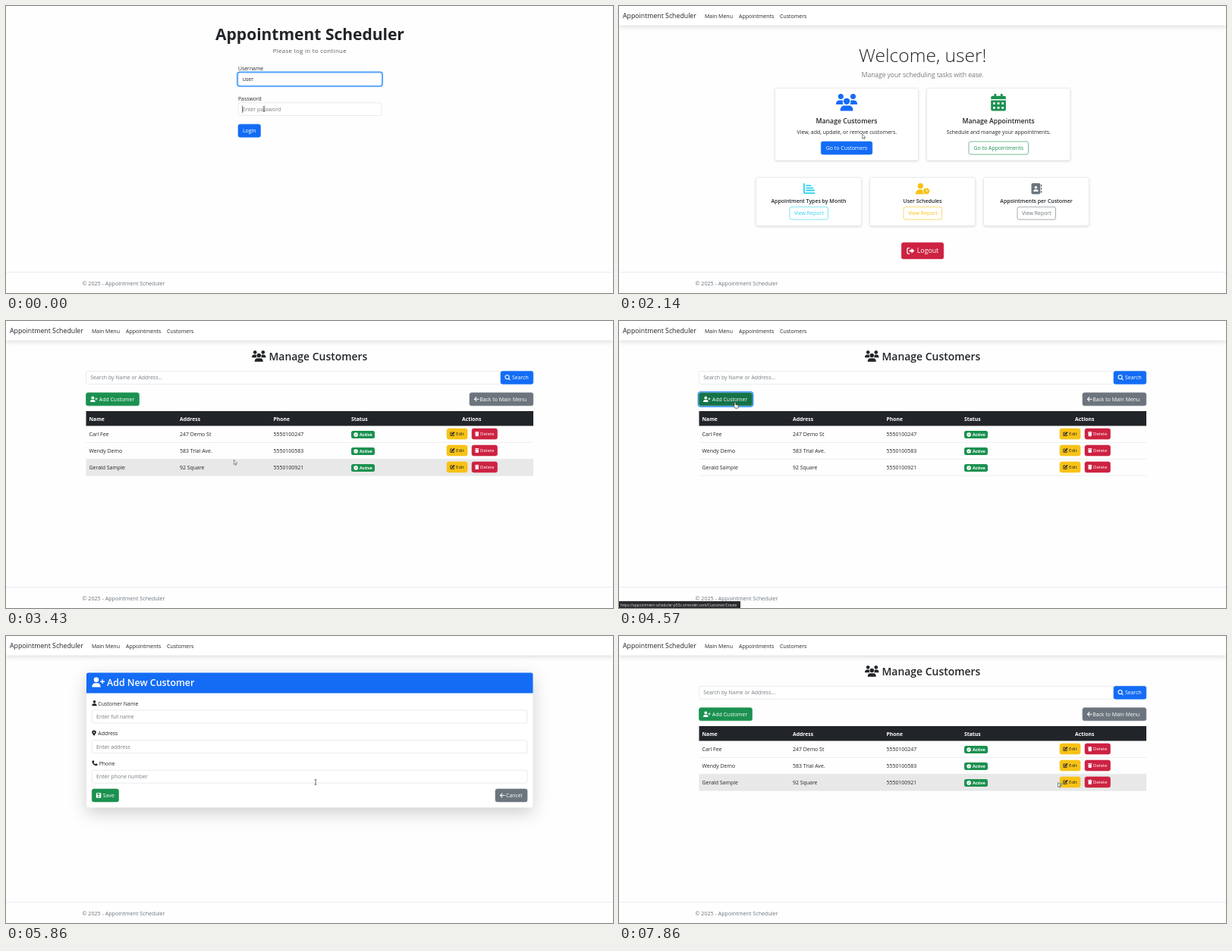
An HTML page for the animation above (8 s loop, 800x379 px).

```html
<!DOCTYPE html>
<html lang="en">
<head>
<meta charset="utf-8">
<title>Appointment Scheduler</title>
<style>
html, body { margin: 0; width: 100%; height: 100%; overflow: hidden; background: #fefefe; }
svg { display: block; width: 800px; height: 379px; font-family: "Open Sans", "Noto Sans", sans-serif; }
text { white-space: pre; }
</style>
</head>
<body>
<svg id="stage" viewBox="0 0 800 379"></svg>
<script>
const INK = '#212529', BLUE = '#146cf5', GREEN = '#1b9150', RED = '#cd2242',
      AMBER = '#f8c216', GREY = '#6c757d', CYAN = '#2fd2ee', EDGE = '#dee2e6';
const LOOP = 8000, TICKS = 56;
const SITE = 'https://appointment-scheduler-p53z.onrender.com/';
const CLICKS = [9, 10, 21, 32, 49];
const PEOPLE = [
  ['Carl Fee', '247 Demo St', '5550100247'],
  ['Wendy Demo', '583 Trial Ave.', '5550100583'],
  ['Gerald Sample', '92 Square', '5550100921']
];
// tick, x, y of the pointer
const PATH = [
  [0, 340, 136], [5, 340, 136], [8, 322, 167], [14, 322, 167], [19, 309, 188], [23, 309, 188],
  [30, 153, 107], [34, 153, 107], [41, 408, 193], [47, 677, 210], [52, 677, 210],
  [53, 650, 202], [55, 578.5, 193.5]
];
// first tick, last tick, path shown in the status bar
const LINKS = [[19, 23, 'Customer'], [29, 34, 'Customer/Create'], [47, 52, 'Customer']];

let tick, pointer, shape;

const text = (x, y, s, size = 6.95, fill = INK, extra = '') =>
  `<text x="${x}" y="${y}" font-size="${size}" fill="${fill}" ${extra}>${s}</text>`;
const mid = (x, y, s, size, fill, weight = 400) =>
  text(x, y, s, size, fill, `text-anchor="middle" font-weight="${weight}"`);
const bold = (x, y, s, size, fill, weight = 600) =>
  text(x, y, s, size, fill, `font-weight="${weight}"`);
const rect = (x, y, w, h, fill, extra = '') =>
  `<rect x="${x}" y="${y}" width="${w}" height="${h}" fill="${fill}" ${extra}/>`;
const line = (x1, x2, y, stroke = EDGE) =>
  `<path d="M${x1} ${y}H${x2}" stroke="${stroke}" stroke-width=".6"/>`;
const ring = (x, y, w, h) =>
  rect(x - 1.2, y - 1.2, w + 2.4, h + 2.4, 'none', 'rx="3.4" stroke="#258cfb" stroke-width="1.3"');
const over = (x, y, w, h) =>
  pointer.x >= x && pointer.x <= x + w && pointer.y >= y && pointer.y <= y + h;

// Glyphs on a grid 16 units high; currentColor is the ink, "back" shows through.
const PERSON = '<circle cx="7" cy="4" r="4"/><path d="M0 16c0-4 2-6.500 5-6.500h4c3 0 5 2.500 5 6.500z"/>';
const GLYPHS = {
  user: () => PERSON,
  userPlus: () => PERSON + '<path d="M17 3.500v7M13.500 7h7" stroke="currentColor" stroke-width="1.700"/>',
  userClock: back => PERSON + `<circle cx="15.500" cy="11.500" r="5" stroke="${back}"/><path d="M15.500 8.500v3h2" fill="none" stroke="${back}"/>`,
  users: () => '<circle cx="4.500" cy="2.500" r="2.500"/><circle cx="16" cy="2.500" r="2.500"/><circle cx="10" cy="7" r="3"/>' +
    '<path d="M4 16c0-3.500 1.500-5 4-5h4c2.500 0 4 1.500 4 5zM0 10c0-2.500 1-4 3-4h2.500l1 .5q-.8 2 .5 3.500zM20 10c0-2.500-1-4-3-4h-2.500l-1 .5q.8 2-.5 3.500z"/>',
  calendar: back => '<path d="M3 0h2v2h4V0h2v2h1.500q1.500 0 1.500 1.500V5H0V3.500Q0 2 1.500 2H3zM0 6h14v8.500q0 1.500-1.500 1.500h-11Q0 16 0 14.500z"/>' +
    `<path d="M2 9h10M2 13h10" stroke="${back}" stroke-width="2" stroke-dasharray="2"/>`,
  chart: () => '<path d="M1 1v12q0 1.500 1.500 1.500H16M4.500 3.500h6M4.500 7h9M4.500 10.500h11" fill="none" stroke="currentColor" stroke-width="2" stroke-linecap="round"/>',
  book: back => `<rect width="13" height="16" rx="2"/><path d="M14.500 2v3M14.500 6.500v3M14.500 11v3" stroke="currentColor" stroke-width="1.500"/>
    <g fill="${back}"><circle cx="6.500" cy="6" r="2"/><path d="M3 12q0-3 2.500-3h2Q10 9 10 12z"/></g>`,
  exit: () => '<path d="M6 2H3Q1 2 1 4v8q0 2 2 2h3" fill="none" stroke="currentColor" stroke-width="2"/><path d="M5.500 6H10V2.500L16 8l-6 5.500V10H5.500z"/>',
  search: () => '<path d="M11 11l4 4M12 6.500a5.500 5.500 0 1 1-11 0a5.500 5.500 0 0 1 11 0" fill="none" stroke="currentColor" stroke-width="2.200"/>',
  back: () => '<path d="M15 8H2M8 2L2 8l6 6" fill="none" stroke="currentColor" stroke-width="2.200"/>',
  check: back => `<circle cx="8" cy="8" r="8"/><path d="M4.500 8l2.500 2.500 4.500-5" fill="none" stroke="${back}" stroke-width="2"/>`,
  edit: () => '<path d="M8 3H2v11h11V9" fill="none" stroke="currentColor" stroke-width="2"/><path d="M5.500 8L12 1.500q1.500-1.500 3 0t0 3L8.500 11l-4 1z"/>',
  trash: () => '<path d="M0 1h4l1-1h4l1 1h4v2H0zM1 4h12l-1 12H2z"/>',
  pin: back => `<path d="M6 16Q0 9 0 6a6 6 0 0 1 12 0q0 3-6 10"/><circle cx="6" cy="6" r="2" fill="${back}"/>`,
  phone: () => '<path d="M1 1l4-1 2 4.500-2.300 2q1.500 3 4.800 4.800l2-2.300 4.500 2-1 4Q13 16 11 15.500 2 13 .3 4.500 0 2 1 1"/>',
  save: back => `<rect y="1" width="14" height="14" rx="2"/><path d="M3 3h7v3.500H3z" fill="${back}"/><circle cx="7" cy="10.500" r="2" fill="${back}"/>`
};
const icon = (name, x, y, h, ink, back = '#fff') =>
  `<g transform="translate(${x} ${y}) scale(${h / 16})" fill="${ink}" color="${ink}">${GLYPHS[name](back)}</g>`;

function button(x, y, w, h, label, color, o = {}) {
  const hot = over(x, y, w, h);
  if (hot) shape = 'hand';
  const fill = o.outline ? '#fff' : hot && o.hover ? o.hover : color;
  const fg = o.outline ? color : o.fg || '#fff';
  const caption = o.icon
    ? icon(o.icon, x + o.pad, y + (h - o.glyph) / 2, o.glyph, fg, fill) + text(x + o.tx, y + h / 2 + o.size * .35, label, o.size, fg)
    : mid(x + w / 2, y + h / 2 + 2.5, label, 6.95, fg);
  return rect(x, y, w, h, fill, `rx="2.5" stroke="${o.outline ? color : fill}" stroke-width=".6"`) + caption +
    (hot && CLICKS.includes(tick) ? ring(x, y, w, h) : '');
}
const iconButton = (x, y, w, h, label, color, glyph, tx, o = {}) =>
  button(x, y, w, h, label, color, { icon: glyph, pad: 5.5, glyph: 7.5, tx, size: 6.95, ...o });

function field(x, y, w, h, hint, value = '', focus = false) {
  if (over(x, y, w, h)) shape = 'beam';
  return rect(x, y, w, h, '#fff', `rx="2.5" stroke="${focus ? '#86b7fe' : EDGE}" stroke-width=".7"`) +
    text(x + 5.8, y + h / 2 + 2.6, value || hint, value[0] === '•' ? 8.3 : 6.95, value ? INK : '#747a80') +
    (focus ? ring(x, y, w, h) : '');
}

const footer = () => line(0, 800, 351.5, EDGE) + text(100.5, 369, '© 2025 - Appointment Scheduler', 7.15, GREY);
const navbar = () =>
  rect(0, 0, 800, 25.5, '#fff', 'style="filter:drop-shadow(0 2px 3px #0002)"') +
  text(5, 16.2, 'Appointment Scheduler', 8.78) +
  text(113, 15.7, 'Main Menu', 7) + text(158, 15.7, 'Appointments', 7) + text(212, 15.7, 'Customers', 7);
const card = (x, y, w, h) =>
  rect(x, y, w, h, '#fff', `rx="2.7" stroke="${EDGE}" stroke-width=".6" style="filter:drop-shadow(0 1px 1.5px #0002)"`);

function loginPage() {
  const typed = '•'.repeat(Math.max(0, Math.min(4, tick - 1)));
  const typing = tick > 0 && tick < 9;
  const caret = tick < 9 ? rect(311.4 + typed.length * 3.1, 131.5, .7, 9.5, INK) : '';
  return mid(400.5, 44.5, 'Appointment Scheduler', 21, INK, 700) +
    text(400.3, 62.2, 'Please log in to continue', 7.8, '#555b61', 'text-anchor="middle" letter-spacing=".34"') +
    text(306, 85.2, 'Username', 6.85) + field(306, 88.3, 189, 16.7, '', 'user', tick === 0) +
    text(306, 124.9, 'Password', 6.85) + field(306, 127.8, 189, 16.7, 'Enter password', typed, typing) + caret +
    button(306, 156.2, 29.5, 17, 'Login', BLUE, { hover: '#1459cc' });
}

function menuPage() {
  const reports = [
    ['Appointment Types by Month', CYAN, 'chart', 243],
    ['User Schedules', AMBER, 'userClock', 391],
    ['Appointments per Customer', GREY, 'book', 543.5]
  ];
  return navbar() +
    mid(400.3, 74, 'Welcome, user!', 24.6, INK, 300) +
    mid(400.3, 93.5, 'Manage your scheduling tasks with ease.', 8.83, '#33383c', 300) +
    card(205.5, 108.5, 189, 95.5) + icon('users', 286, 116, 22.5, BLUE) +
    mid(300, 154.5, 'Manage Customers', 8.68, INK, 600) +
    mid(300.3, 168.7, 'View, add, update, or remove customers.') +
    button(266.3, 179, 67.5, 17, 'Go to Customers', BLUE, { hover: '#1468ee' }) +
    card(405.5, 108.5, 189.3, 95.5) + icon('calendar', 490.2, 116, 22.5, GREEN) +
    mid(500, 154.5, 'Manage Appointments', 8.68, INK, 600) +
    mid(500.3, 168.7, 'Schedule and manage your appointments.') +
    button(461, 179, 78.5, 17, 'Go to Appointments', GREEN, { outline: true }) +
    reports.map(([title, color, glyph, gx], i) => {
      const x = 180.5 + i * 150;
      return card(x, 226.5, 139, 63.7) + icon(glyph, gx, 234, 14.5, color) +
        mid(x + 69.5, 260, title, 6.95, INK, 600) +
        button(x + 44.5, 265.3, 50.5, 16.7, 'View Report', color, { outline: true });
    }).join('') +
    iconButton(372.3, 312.6, 55.5, 21.3, 'Logout', RED, 'exit', 20.5, { size: 8.78, pad: 7, glyph: 10 });
}

function customersPage() {
  const heads = [[109.5, 'Name'], [229, 'Address'], [352.5, 'Phone'], [455, 'Status'], [601, 'Actions']];
  const rows = PEOPLE.map((person, i) => {
    const y = 138.5 + i * 21.9, base = y + 13.3;
    const hot = over(105.5, y, 589.5, 21.9);
    return (hot ? rect(105.5, y, 589.5, 21.9, '#e8e8e9') : '') + line(105.5, 695, y + 21.9) +
      person.map((s, col) => text(heads[col][0], base, s)).join('') +
      rect(455, y + 6.6, 31, 10, GREEN, 'rx="2.5"') + icon('check', 458.3, y + 8.8, 5.6, '#fff', GREEN) +
      bold(466, y + 13.6, 'Active', 5.4, '#fff', 700) +
      iconButton(581, y + 3.6, 27, 14, 'Edit', AMBER, 'edit', 12, { fg: INK, size: 6.1, pad: 4, glyph: 6.5 }) +
      iconButton(614, y + 3.6, 33.5, 14, 'Delete', RED, 'trash', 11, { size: 6.1, pad: 4, glyph: 6.2 });
  }).join('');
  return navbar() + icon('users', 324, 39, 14.8, INK) + bold(346.5, 51.6, 'Manage Customers', 13.93) +
    field(105.5, 66.3, 547, 17, 'Search by Name or Address...') +
    iconButton(652, 66.3, 42.8, 17, 'Search', BLUE, 'search', 15) +
    iconButton(105.5, 94.8, 70, 17, 'Add Customer', GREEN, 'userPlus', 17.3, { hover: '#157347' }) +
    iconButton(611, 94.8, 83.8, 17, 'Back to Main Menu', GREY, 'back', 13.2) +
    rect(105.5, 119, 589.5, 19.5, INK) +
    heads.map(([x, s]) => bold(x, 131.5, s, 6.8, '#fff', 700)).join('') + rows;
}

function addPage() {
  const inputs = [
    ['user', 'Customer Name', 'Enter full name'],
    ['pin', 'Address', 'Enter address'],
    ['phone', 'Phone', 'Enter phone number']
  ];
  return navbar() +
    rect(106, 48.5, 588.5, 178, '#fff', 'rx="2.7" style="filter:drop-shadow(0 7.3px 11px rgba(0,0,0,.19))"') +
    `<path d="M106 75.500V51q0-2.500 2.500-2.500h583.500q2.500 0 2.500 2.500v24.500z" fill="${BLUE}"/>` +
    icon('userPlus', 113.3, 54.5, 13, '#fff') + bold(133, 65.6, 'Add New Customer', 12.4, '#fff') +
    inputs.map(([glyph, label, hint], i) => {
      const y = 98 + i * 39.6;
      return icon(glyph, 113.3, y - 13, 7.3, INK) + text(i === 2 ? 122.7 : 121.3, y - 6.5, label) +
        field(113.3, y, 573.7, 17, hint);
    }).join('') +
    iconButton(113.3, 202, 35.2, 17, 'Save', GREEN, 'save', 14.5) +
    iconButton(645, 202, 42, 17, 'Cancel', GREY, 'back', 14, { hover: '#565d64' });
}

function statusBar() {
  const link = LINKS.find(([from, to]) => tick >= from && tick <= to);
  if (!link) return '';
  return rect(0, 370, link[2].length > 8 ? 160 : 143, 9, '#2b2b2d') + text(1.8, 376.5, SITE + link[2], 4.78, '#d8d8da');
}

function cursor() {
  const art = {
    beam: '<path d="M-1.300-3.200h2.600M-1.300 3.200h2.600M0-3.200v6.400" stroke="#333" stroke-width=".7"/>',
    hand: '<path d="M0 0q.9 0 .9 1v2.500l2.600.6q.9.3.8 1.300l-.5 2.800H.2L-1.800 5q0-.9.9-.6V1Q-.9 0 0 0z" fill="#fff" stroke="#111" stroke-width=".6"/>',
    arrow: '<path d="M0 0v6l1.400-1.200 1 2 .9-.4-1-2H4.200z" fill="#fff" stroke="#222" stroke-width=".5"/>'
  }[shape];
  const busy = tick >= 54 ? '<circle cx="4" cy="2" r="1.400" fill="none" stroke="#2b8fd0" stroke-width=".8"/>' : '';
  return `<g transform="translate(${pointer.x} ${pointer.y})">${art}${busy}</g>`;
}

function pointerAt(n) {
  const i = Math.max(1, PATH.findIndex(p => p[0] >= n));
  const [t0, x0, y0] = PATH[i - 1], [t1, x1, y1] = PATH[i];
  const u = (n - t0) / (t1 - t0), k = u * u * (3 - 2 * u);
  return { x: x0 + (x1 - x0) * k, y: y0 + (y1 - y0) * k };
}

function pageAt(n) {
  if (n < 11) return loginPage;
  if (n < 22) return menuPage;
  if (n < 33) return customersPage;
  return n < 50 ? addPage : customersPage;
}

const stage = document.getElementById('stage');
function draw(ms) {
  const now = Math.floor((ms % LOOP) / LOOP * TICKS + .05) % TICKS;
  if (now !== tick) {
    tick = now;
    pointer = pointerAt(tick);
    shape = 'arrow';
    const page = pageAt(tick)();
    stage.innerHTML = footer() + page + statusBar() + cursor();
  }
}

const start = performance.now();
function loop() {
  draw(performance.now() - start);
  requestAnimationFrame(loop);
}
loop();
</script>
</body>
</html>
```
